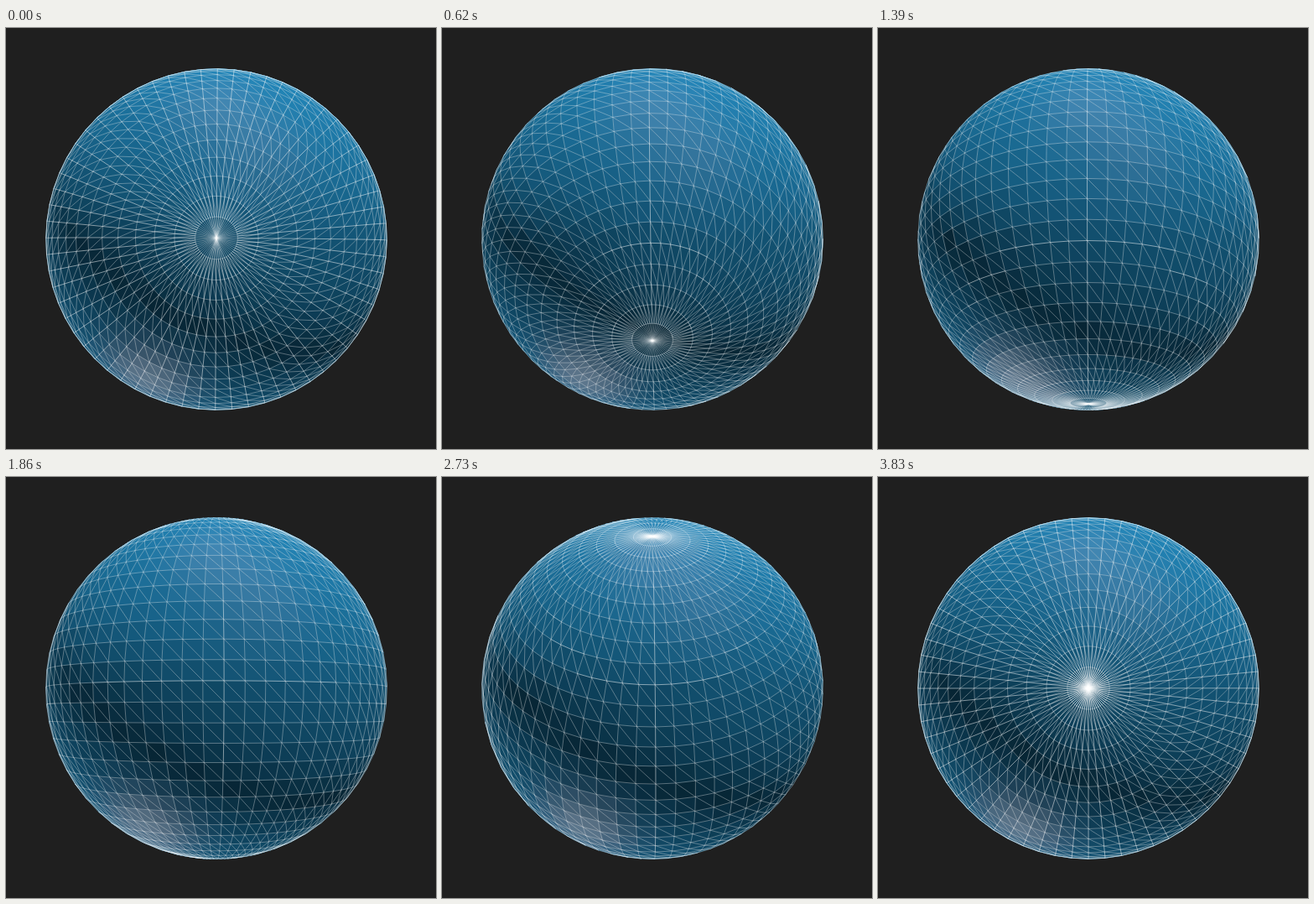
Write an HTML page with a canvas that moves like this. It is 513 px wide and 502 px high and loops after 3910 ms.

```html
<!DOCTYPE html>
<html lang="en">
<head>
<meta charset="utf-8">
<title>Wireframe sphere</title>
<style>
  html, body { margin: 0; width: 100%; height: 100%; overflow: hidden; background: #1f1f1f; }
  canvas { display: block; }
</style>
</head>
<body>
<canvas id="stage" width="513" height="502"></canvas>
<script>
const ctx = document.getElementById('stage').getContext('2d');
const COLS = 64, ROWS = 32;
const CX = 251, CY = 252, FOCAL = 848, DISTANCE = 30 / 7;
const RAD = Math.PI / 180;

// Each pose holds for 80 ms, apart from a few shorter and longer ones.
const STEPS = 50;
const SHORT = [0, 6, 9, 11, 14, 20, 23, 27, 28, 40, 41], LONG = [13, 24];
const holds = Array.from({ length: STEPS }, (_, i) =>
  SHORT.includes(i) ? 70 : LONG.includes(i) ? 90 : 80);
const LOOP = holds.reduce((a, b) => a + b);

const dot = (a, b) => a[0] * b[0] + a[1] * b[1] + a[2] * b[2];
const sub = (a, b) => a.map((v, i) => v - b[i]);
const add = (a, b) => a.map((v, i) => v + b[i]);
const unit = a => a.map(v => v / Math.hypot(...a));
const cross = (a, b) => [
  a[1] * b[2] - a[2] * b[1],
  a[2] * b[0] - a[0] * b[2],
  a[0] * b[1] - a[1] * b[0]
];

const EYE = [0, 0, DISTANCE];
const LIGHTS = [[0, 1, 0], [1, 2, 1], [-1, -2, -1]].map(unit);
const INTENSITY = 3, SHININESS = 30;
const toLinear = c => {
  c /= 255;
  return c <= 0.04045 ? c / 12.92 : ((c + 0.055) / 1.055) ** 2.4;
};
const toSRGB = c => Math.round(255 * Math.min(1,
  c <= 0.0031308 ? c * 12.92 : 1.055 * c ** (1 / 2.4) - 0.055));
const DIFFUSE = [0x15, 0x62, 0x89].map(toLinear);
const EMISSIVE = [0x07, 0x25, 0x34].map(toLinear);
const SPECULAR = toLinear(0x11);

// Blinn-Phong with Schlick's Fresnel term, in linear light.
function shade(normal, view) {
  let diffuse = 0, gloss = 0;
  for (const light of LIGHTS) {
    const lit = INTENSITY * Math.max(0, dot(normal, light));
    const half = unit(add(light, view));
    const vh = dot(view, half);
    const fresnel = 2 ** ((-5.55473 * vh - 6.98316) * vh);
    const lobe = (SHININESS / 2 + 1) / Math.PI * Math.max(0, dot(normal, half)) ** SHININESS;
    diffuse += lit / Math.PI;
    gloss += lit * (SPECULAR * (1 - fresnel) + fresnel) * lobe / 4;
  }
  return `rgb(${DIFFUSE.map((c, i) => toSRGB(c * diffuse + EMISSIVE[i] + gloss))})`;
}

function vertex(row, col, angle) {
  const theta = row / ROWS * Math.PI, phi = col / COLS * 2 * Math.PI + angle;
  const x = -Math.cos(phi) * Math.sin(theta);
  const y = Math.cos(theta);
  const z = Math.sin(phi) * Math.sin(theta);
  const c = Math.cos(angle), s = Math.sin(angle);
  const pos = [x, y * c - z * s, y * s + z * c];
  const scale = FOCAL / (DISTANCE - pos[2]);
  return { pos, x: CX + pos[0] * scale, y: CY - pos[1] * scale };
}

function makeFace(a, b, c) {
  const normal = unit(cross(sub(b.pos, a.pos), sub(c.pos, a.pos)));
  const center = add(add(a.pos, b.pos), c.pos).map(v => v / 3);
  const view = unit(sub(EYE, center));
  return { points: [a, b, c], normal, view, front: dot(normal, view) > 0 };
}

function fillFace({ points: [a, b, c], normal, view, front }) {
  if (!front) return;
  ctx.fillStyle = ctx.strokeStyle = shade(normal, view);
  ctx.beginPath();
  ctx.moveTo(a.x, a.y);
  ctx.lineTo(b.x, b.y);
  ctx.lineTo(c.x, c.y);
  ctx.closePath();
  ctx.fill();
  ctx.stroke();
}

// An edge shows in full only where the surface falls away on both sides.
function drawEdge(p, q, f, g) {
  if (!f.front && !g.front) return;
  const across = n => n[0] * (q.y - p.y) + n[1] * (q.x - p.x);
  const ridge = across(f.normal) * across(g.normal) < 0;
  ctx.lineWidth = ridge ? 1 : 0.65;
  ctx.beginPath();
  ctx.moveTo(p.x, p.y);
  ctx.lineTo(q.x, q.y);
  ctx.stroke();
}

function draw(step) {
  const angle = (89.65 + 3.68 * step) * RAD;
  const grid = Array.from({ length: ROWS + 1 }, (_, r) =>
    Array.from({ length: COLS }, (_, c) => vertex(r, c, angle)));
  const quads = Array.from({ length: ROWS }, (_, r) =>
    Array.from({ length: COLS }, (_, col) => {
      const next = (col + 1) % COLS;
      const a = grid[r][next], b = grid[r][col], c = grid[r + 1][col], d = grid[r + 1][next];
      let upper = r > 0 && makeFace(a, b, d);
      const lower = r < ROWS - 1 ? makeFace(b, c, d) : upper;
      upper = upper || lower;
      return { a, b, c, d, upper, lower };
    }));

  ctx.fillStyle = '#1f1f1f';
  ctx.fillRect(0, 0, 513, 502);
  ctx.lineWidth = 0.6;
  ctx.lineJoin = 'round';
  for (const { upper, lower } of quads.flat()) {
    fillFace(upper);
    if (lower !== upper) fillFace(lower);
  }

  ctx.strokeStyle = 'rgba(255,255,255,.5)';
  quads.forEach((row, r) => row.forEach((quad, col) => {
    const { a, b, c, d, upper, lower } = quad;
    const before = row[(col + COLS - 1) % COLS].upper;
    drawEdge(b, c, lower, before);
    if (r > 0) {
      drawEdge(a, b, upper, quads[r - 1][col].lower);
      drawEdge(b, d, upper, r < ROWS - 1 ? lower : before);
    }
  }));
}

let shown = -1;
function tick() {
  let t = performance.now() % LOOP, step = 0;
  while (t >= holds[step]) t -= holds[step++];
  if (step !== shown) draw(shown = step);
  requestAnimationFrame(tick);
}
tick();
</script>
</body>
</html>
```
